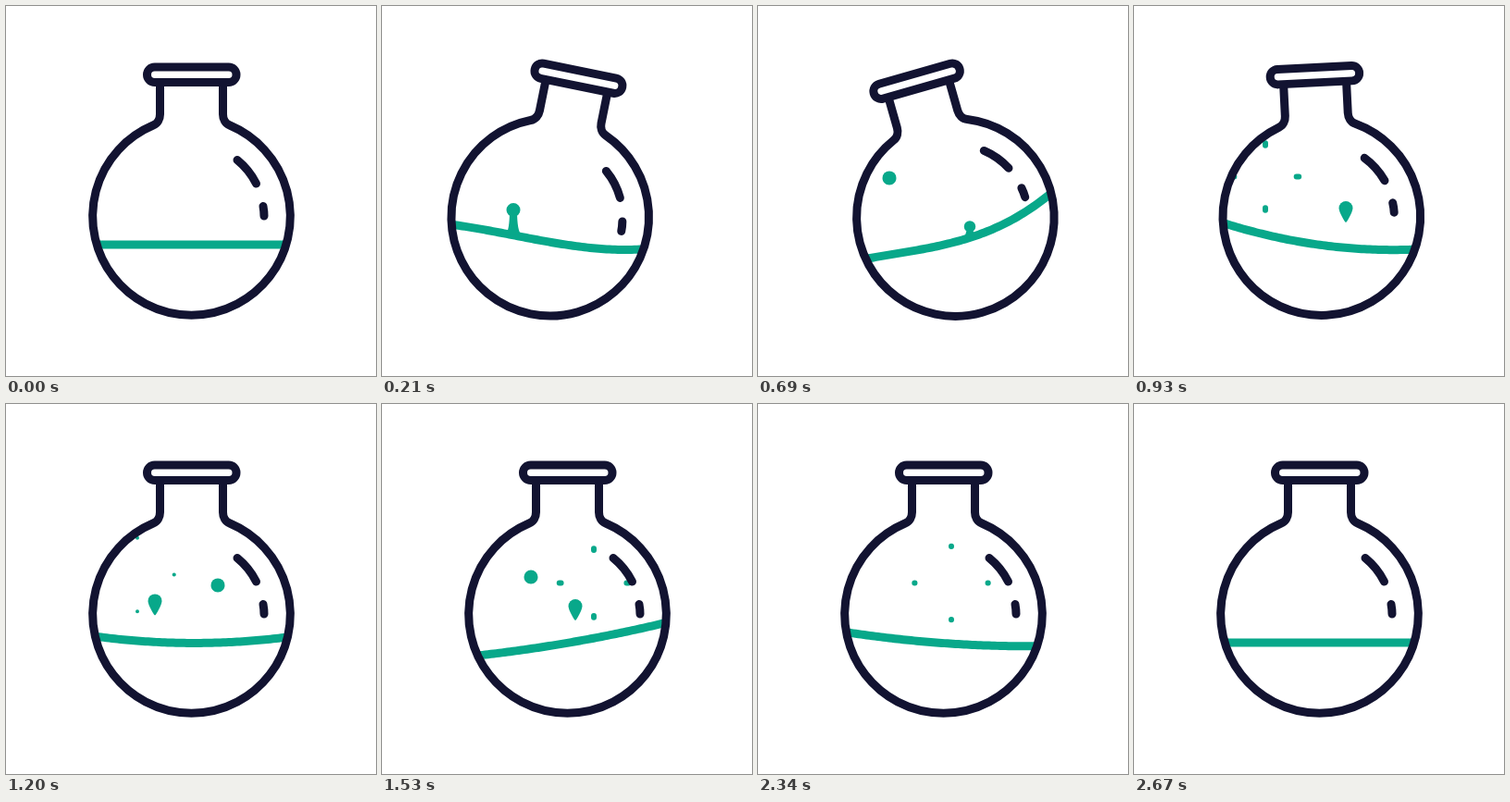
These frames come from a looping animation (400 px wide and 400 px high, 4.7 s). An HTML page with a canvas:

```html
<!DOCTYPE html>
<html lang="en">
<head>
<meta charset="utf-8">
<title>Bubbling flask</title>
<style>
  html, body { margin: 0; width: 100%; height: 100%; overflow: hidden; background: #fff; }
  canvas { display: block; width: 400px; height: 400px; }
</style>
</head>
<body>
<canvas id="stage"></canvas>
<script>
const LOOP = 4700, STEP = 30;
const DARK = '#121331', TEAL = '#08a88a';
const CX = 200.5, CY = 227.5, R = 106.8;
const LEVEL = 258, DROP = 7.5, SPREAD = 40;

const canvas = document.getElementById('stage');
const ctx = canvas.getContext('2d');
const ratio = window.devicePixelRatio || 1;
canvas.width = canvas.height = 400 * ratio;

const clamp = v => Math.min(1, Math.max(0, v));
const mix = (a, b, k) => a + (b - a) * k;

// Eases in and out between poses of the form [time, ...values].
function poseAt(poses, t) {
  const next = poses.findIndex(p => p[0] > t);
  if (next < 0) return poses.at(-1).slice(1);
  const a = poses[next - 1], b = poses[next];
  const s = (t - a[0]) / (b[0] - a[0]), k = s * s * (3 - 2 * s);
  return a.slice(1).map((v, i) => mix(v, b[i + 1], k));
}

// time, shift, turn in degrees
const swing = [
  [0, 0, 0],
  [350, -29, 17.7],
  [700, 13, -16],
  [1015, 0, 0]
];

// time, then the cubic of the surface: lift, tilt, bend, twist
const slosh = [
  [0, 0, 0, 0, 0],
  [420, -5.5, 36.5, -11.5, -10.5],
  [690, -3, -28, -17, -9],
  [930, 0.5, 14, -9.5, 0],
  [1530, 0.3, -18, -3.5, 0],
  [2040, 1, 14, -8, 0],
  [2670, 0, 0, 0, 0]
];

// Where each drop bursts and when it is halfway up.
const drops = [
  { x: 142, y: 184.5, start: 360 },
  { x: 229, y: 193.5, start: 930 },
  { x: 161, y: 185, start: 1240 },
  { x: 209, y: 193.5, start: 1530 }
];

const body = new Path2D('M166.5 84V117C166.5 122 164 127 159 129' +
  `A${R} ${R} 0 1 0 242 129C237 127 234.5 122 234.5 117V84`);
const lid = new Path2D();
lid.roundRect(152.5, 66, 96.5, 16.5, 8.25);
const shine = new Path2D('M250 166.5C258 173 265 181 270.5 192M278 216.5Q279 222 279 227');

function drawLiquid(surface, cx) {
  ctx.beginPath();
  for (let x = cx - R; x <= cx + R; x += 3) ctx.lineTo(x, surface(x));
  ctx.lineWidth = 9;
  ctx.stroke();
}

// A bead on a stalk that grows out of the liquid.
function drawStalk(x, y, base, grow) {
  const r = DROP * grow, foot = 9 * grow, neck = 4 * grow;
  const cy = mix(base, y, grow);
  ctx.beginPath();
  ctx.arc(x, cy, r, 0, 7);
  ctx.moveTo(x - foot, base);
  ctx.quadraticCurveTo(x - neck, base - neck, x - neck, cy);
  ctx.lineTo(x + neck, cy);
  ctx.quadraticCurveTo(x + neck, base - neck, x + foot, base);
  ctx.fill();
}

// A pointed drop; it is a circle when the tail equals the radius.
function drawTear(x, y, r, tail) {
  const tip = 0.55 * r * (r / tail) ** 2, side = 0.55 * r;
  ctx.beginPath();
  ctx.arc(x, y, r, Math.PI, 0);
  ctx.bezierCurveTo(x + r, y + side, x + tip, y + tail, x, y + tail);
  ctx.bezierCurveTo(x - tip, y + tail, x - r, y + side, x - r, y);
  ctx.fill();
}

// Four dashes that fly apart, slow down and shorten to dots.
function drawBurst(x, y, age) {
  const reach = SPREAD * (1 - Math.exp(-age / 92));
  const half = Math.min(reach, (SPREAD - reach) / 2) / 2;
  ctx.lineWidth = 6 * clamp(age / 30) * clamp((520 - age) / 90);
  ctx.beginPath();
  for (const [dx, dy] of [[1, 0], [-1, 0], [0, 1], [0, -1]]) {
    ctx.moveTo(x + dx * (reach - half), y + dy * (reach - half));
    ctx.lineTo(x + dx * (reach + half), y + dy * (reach + half));
  }
  ctx.stroke();
}

function drawDrop({ x, y, start }, t, surface) {
  const age = t - start;
  if (age <= -290 || age >= 900) return;
  const depth = age < 0 ? 25 - age * 0.073 : 25 * Math.exp(-age / 115);
  const size = clamp((420 - age) / 50);

  if (age < -140) drawStalk(x, y + depth, surface(x), clamp((age + 290) / 60));
  else if (size > 0) {
    const tail = DROP + 8 * clamp(1 - age / 200);
    drawTear(x, y + depth, DROP * size, tail * size);
  }
  if (age > 380) drawBurst(x, y, age - 380);
}

function drawFlask(x, y, turn) {
  ctx.save();
  ctx.translate(CX + x, CY + y);
  ctx.rotate(turn * Math.PI / 180);
  ctx.translate(-CX, -CY);
  ctx.strokeStyle = DARK;
  ctx.lineWidth = 9;
  [body, lid, shine].forEach(p => ctx.stroke(p));
  ctx.restore();
}

function draw(t) {
  const [x, turn] = poseAt(swing, t);
  const [lift, tilt, bend, twist] = poseAt(slosh, t);
  const y = Math.abs(turn) / 14, cx = CX + x;
  const surface = px => {
    const u = (px - cx) / 105;
    return LEVEL + lift + u * (tilt + u * (bend + u * twist));
  };

  ctx.setTransform(ratio, 0, 0, ratio, 0, 0);
  ctx.fillStyle = '#fff';
  ctx.fillRect(0, 0, 400, 400);
  ctx.lineCap = ctx.lineJoin = 'round';

  ctx.save();
  ctx.beginPath();
  ctx.arc(cx, CY + y, R - 1, 0, 7);
  ctx.clip();
  ctx.fillStyle = ctx.strokeStyle = TEAL;
  drawLiquid(surface, cx);
  drops.forEach(drop => drawDrop(drop, t, surface));
  ctx.restore();

  drawFlask(x, y, turn);
}

const begin = performance.now();
function tick() {
  const t = (performance.now() - begin) % LOOP;
  draw(Math.floor(t / STEP) * STEP);
  requestAnimationFrame(tick);
}
tick();
</script>
</body>
</html>
```
